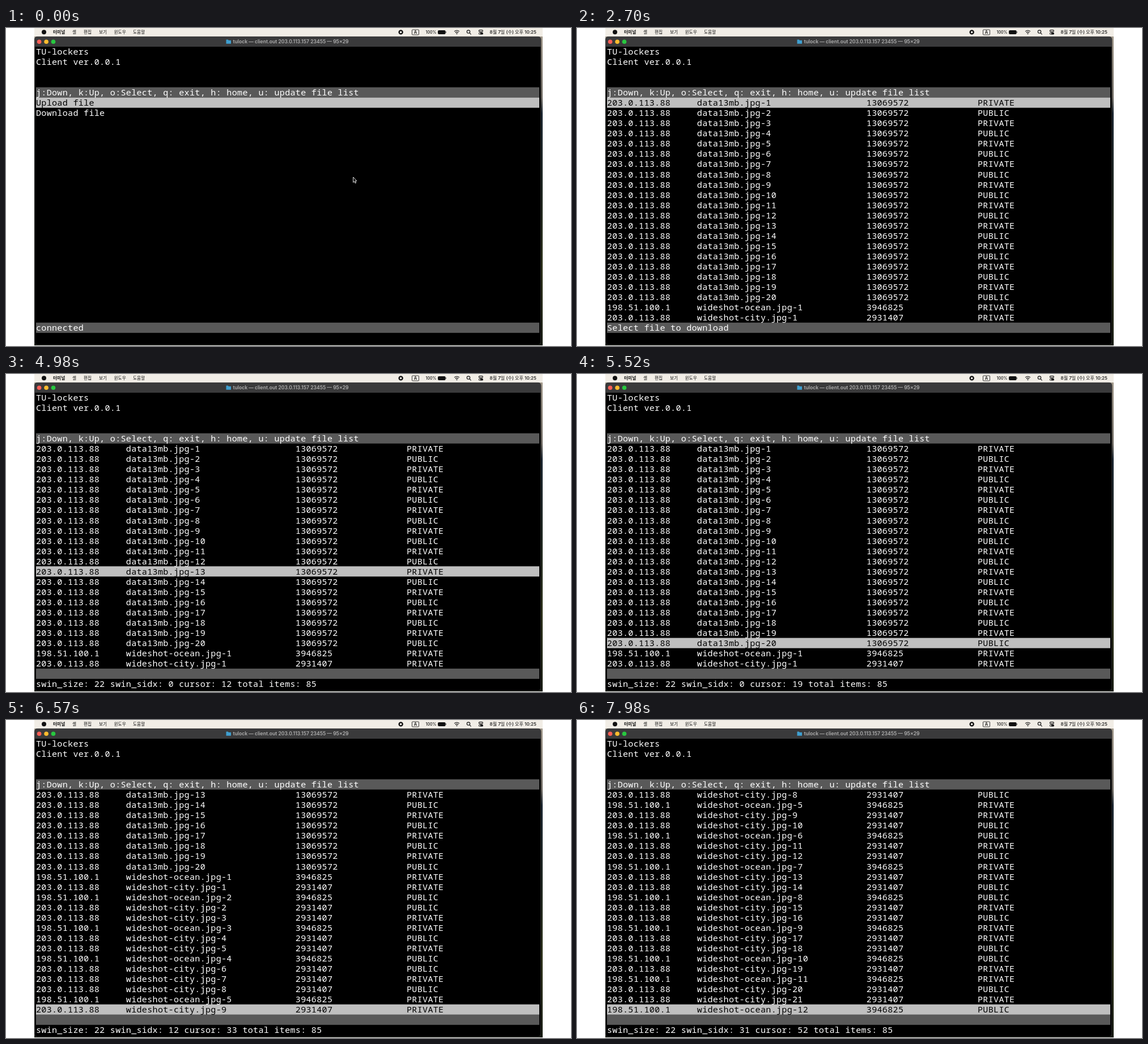
These frames come from a looping animation (997x561 px, 8 s). An HTML page:

```html
<!DOCTYPE html>
<html lang="ko">
<head>
<meta charset="utf-8">
<style>
  html, body { margin: 0; width: 100%; height: 100%; overflow: hidden; background: #fff; }
  svg { display: block; width: 100%; height: 100%; }
  text { white-space: pre; }
  .menu { font: 500 7.7px Inter, "Noto Sans CJK KR", "Noto Sans CJK", sans-serif; fill: #111; }
  .menu .app { font-weight: 700; }
  .menu .battery { font-size: 7px; }
  .menu .clock { font-size: 8.1px; }
  .title { font: 600 8.6px Inter, sans-serif; fill: #b0b0b0; }
  .term { font: 400 15.1px "Noto Sans Mono", monospace; letter-spacing: .287px; fill: #fff; }
</style>
</head>
<body>
<svg viewBox="0 0 997 561">
  <defs>
    <linearGradient id="wall" x1="0" y1="0" x2="0" y2="1">
      <stop offset="0" stop-color="#a39a8c"/>
      <stop offset=".2" stop-color="#6f6a62"/>
      <stop offset=".25" stop-color="#18232e"/>
      <stop offset=".5" stop-color="#1a221c"/>
      <stop offset=".75" stop-color="#2b2f17"/>
      <stop offset="1" stop-color="#14180f"/>
    </linearGradient>
  </defs>
  <rect x="50" y="14" width="897" height="546" fill="url(#wall)"/>
  <rect x="50" width="897" height="15" fill="#f1ede6"/>

  <g class="menu">
    <circle cx="67" cy="7.2" r="4"/>
    <text class="app" x="83" y="9.9">터미널</text>
    <text x="117" y="9.9">셀</text>
    <text x="137" y="9.9">편집</text>
    <text x="164" y="9.9">보기</text>
    <text x="190.5" y="9.9">윈도우</text>
    <text x="224" y="9.9">도움말</text>
    <circle cx="696.7" cy="7.4" r="3" fill="none" stroke="#111" stroke-width="2.4"/>
    <rect x="716.5" y="3" width="12" height="9" rx="1" fill="none" stroke="#222" stroke-width=".9"/>
    <text x="722.5" y="10.2" text-anchor="middle">A</text>
    <text class="battery" x="759.5" y="10" text-anchor="end">100%</text>
    <rect x="762" y="3.9" width="13.6" height="7" rx="2"/>
    <path d="M776.4 6v2.8" stroke="#555"/>
    <g fill="none" stroke="#111" stroke-width="1.1">
      <path d="M791 6.2q4.5-3.8 9 0M792.8 8.2q2.7-2.2 5.4 0"/>
      <circle cx="816" cy="6.6" r="2.7"/>
      <path d="M818 8.7l2.6 2.6"/>
      <rect x="834.4" y="3.6" width="7" height="3" rx="1.5"/>
    </g>
    <circle cx="795.5" cy="10" r="1"/>
    <rect x="834" y="7.8" width="8" height="3.8" rx="1.9"/>
    <circle cx="836" cy="9.7" r="1.1" fill="#f1ede6"/>
    <text class="clock" x="936" y="10" text-anchor="end">8월 7일 (수) 오후 10:25</text>
  </g>

  <rect x="50.4" y="15.4" width="893.4" height="543.4" rx="5" stroke="#333" stroke-width=".8"/>
  <path d="M50.4 33V20q0-5 5-5h883.4q5 0 5 5v13z" fill="#3a3a3b"/>
  <circle cx="58.6" cy="24.3" r="3.8" fill="#ff5f57"/>
  <circle cx="71.1" cy="24.3" r="3.8" fill="#febc2e"/>
  <circle cx="83.5" cy="24.3" r="3.8" fill="#28c840"/>
  <path d="M388.500 20.500h3.300l1 1.200h4.200v6h-8.500z" fill="#3f9fd0"/>
  <text class="title" x="502.500" y="27.200" text-anchor="middle">tulock — client.out 203.0.113.157 23455 — 95×29</text>

  <g id="bars"></g>
  <g id="rows" class="term"></g>
  <path id="pointer" d="M612.700 263v9.400l2-1.900 1.500 3.300 1.500-.7-1.500-3.200h2.700z" stroke="#fff" stroke-width=".9"/>
</svg>
<script>
const LOOP = 8000, TICK = 30;
const MENU_DOWN = 1710, LIST_OPEN = 2220, FIRST_DOWN = 3570, SECOND_DOWN = 3840, REPEAT = 4290;
const LEFT = 53, WIDTH = 888, TOP = 32.4, PITCH = 18.05, BASELINE = 14.5, ROWS = 29;
const HEAD = 4, BODY = 5, STATUS = 27, DEBUG = 28, VIEW = 22;
const NS = 'http://www.w3.org/2000/svg';
const byId = id => document.getElementById(id);
const rowY = r => TOP + r * PITCH;

function add(parent, tag, attrs) {
  const el = document.createElementNS(NS, tag);
  for (const k in attrs) el.setAttribute(k, attrs[k]);
  return parent.appendChild(el);
}

const addBar = (r, fill) => add(byId('bars'), 'rect',
  { x: LEFT, y: rowY(r), width: WIDTH, height: PITCH, fill });

addBar(HEAD, '#595959');
addBar(STATUS, '#595959');
const highlight = addBar(BODY, '#bfbfbf');
const lines = Array.from({ length: ROWS }, (_, r) =>
  add(byId('rows'), 'text', { x: LEFT, y: rowY(r) + BASELINE }));

// d: data, o: ocean, c: city
const KINDS = {
  d: ['203.0.113.88', 'data13mb', 13069572],
  o: ['198.51.100.1', 'wideshot-ocean', 3946825],
  c: ['203.0.113.88', 'wideshot-city', 2931407]
};
const count = { d: 0, o: 0, c: 0 };
const files = [...'d'.repeat(20) + 'ococcoccocccoccoccoccoccoccococco'].map(kind => {
  const [ip, name, size] = KINDS[kind], n = ++count[kind];
  return ip.padEnd(17) + `${name}.jpg-${n}`.padEnd(32) + String(size).padEnd(21) +
    (n % 2 ? 'PRIVATE' : 'PUBLIC');
});
const menu = ['Upload file', 'Download file'];

function listCursor(t) {
  if (t < FIRST_DOWN) return 0;
  if (t < SECOND_DOWN) return 1;
  if (t < REPEAT) return 2;
  return 3 + Math.floor((t - REPEAT + 2.5) / 75.2);
}

function stateAt(t) {
  if (t < LIST_OPEN) {
    const moved = t >= MENU_DOWN;
    return { items: menu, total: 2, cursor: +moved, status: moved ? '' : 'connected', debug: moved };
  }
  const moved = t >= FIRST_DOWN;
  return { items: files, total: 85, cursor: listCursor(t),
    status: moved ? '' : 'Select file to download', debug: moved };
}

function draw(time) {
  const t = Math.floor(time / TICK) * TICK;
  const { items, total, cursor, status, debug } = stateAt(t);
  const first = Math.max(0, cursor - VIEW + 1);
  const picked = BODY + cursor - first;
  const text = Array(ROWS).fill('');
  text[0] = 'TU-lockers';
  text[1] = 'Client ver.0.0.1';
  text[HEAD] = 'j:Down, k:Up, o:Select, q: exit, h: home, u: update file list';
  items.slice(first, first + VIEW).forEach((s, i) => { text[BODY + i] = s; });
  text[STATUS] = status;
  if (debug) text[DEBUG] =
    `swin_size: ${VIEW} swin_sidx: ${first} cursor: ${cursor} total items: ${total}`;

  lines.forEach((el, r) => {
    if (el.textContent !== text[r]) el.textContent = text[r];
    el.style.fill = r === picked ? '#000' : '#fff';
  });
  highlight.setAttribute('y', rowY(picked));
  byId('pointer').style.display = t < MENU_DOWN ? '' : 'none';
}

const start = performance.now();
function frame() {
  draw((performance.now() - start) % LOOP);
  requestAnimationFrame(frame);
}
frame();
</script>
</body>
</html>
```
